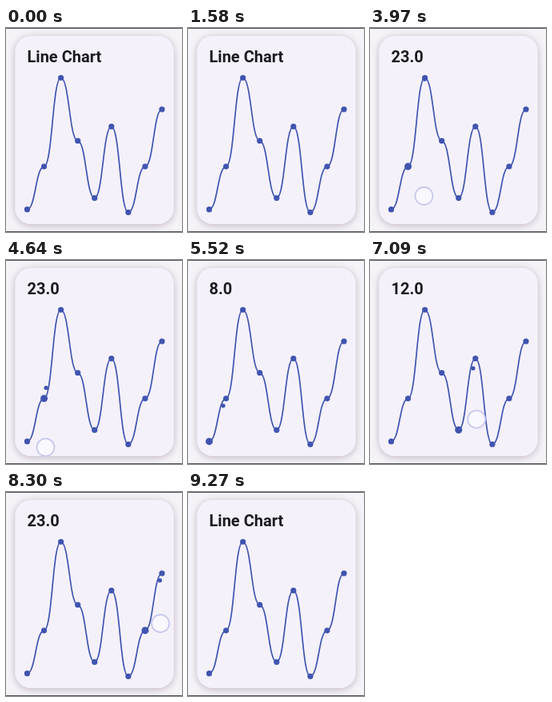
Write an HTML page that moves like this. It is 220 px wide and 256 px high and loops after 9300 ms.

```html
<!DOCTYPE html>
<html lang="en">
<head>
<meta charset="utf-8">
<title>Line Chart</title>
<style>
  html, body { margin: 0; width: 100%; height: 100%; overflow: hidden; background: #f5f2f8; }
  svg { display: block; width: 220px; height: 256px; }
  text { font: 700 20px Roboto, sans-serif; fill: #1b1b20; }
</style>
</head>
<body>
<svg viewBox="0 0 220 256">
  <defs>
    <filter id="shadow" x="-20%" y="-20%" width="140%" height="140%">
      <feDropShadow dx="0" dy="1.5" stdDeviation="4" flood-color="#2a2733" flood-opacity=".28"/>
    </filter>
  </defs>
  <rect width="220" height="256" fill="#f5f2f8"/>
  <rect x="11.5" y="10" width="198" height="236" rx="20" fill="#f4f1fa" filter="url(#shadow)"/>
  <rect width="220" height="1" fill="#55535a"/>
  <rect y="255" width="220" height="1" fill="#55535a"/>
  <text id="title" x="26.5" y="43"></text>
  <path id="line" fill="none" stroke="#4054b0" stroke-width="1.7"/>
  <g id="dots" fill="#4054b0"></g>
  <circle id="marker" r="2.6" fill="#4054b0"/>
  <circle id="touch" r="11" fill="#fbfaff" fill-opacity=".75" stroke="#c9c9ee" stroke-width="1.8"/>
</svg>
<script>
const LOOP = 9300;
const MIDDLE = 147;
const LAG = 25;
const values = [8, 23, 54, 32, 12, 37, 7, 23, 43];
const left = 26.5, step = 21.06;
const pointX = i => left + step * i;
const valueY = v => 62.5 + (54 - v) * 3.59;

// Each drag: visible and active periods, then [time, x, y] waypoints.
const drags = [
  { show: 2880, start: 2880, end: 6390, path: [
    [2880, 99, 182], [3270, 88, 191], [3800, 73, 205], [4300, 57, 223], [4640, 49.5, 235],
    [4730, 46.8, 239], [4950, 52, 247], [5300, 46, 261], [5520, 44, 269]] },
  { show: 6730, start: 6880, end: 9090, path: [
    [6730, 90, 213.5], [6870, 90, 213.5], [7000, 114, 206], [7090, 133, 200], [7300, 153, 192],
    [7600, 170, 184], [7820, 178, 179], [8300, 193, 165], [8700, 202, 160]] }
];

const $ = id => document.getElementById(id);
const clamp = (v, lo, hi) => Math.min(hi, Math.max(lo, v));
const easeInOut = p => p < .5 ? 4 * p ** 3 : 1 - (2 - 2 * p) ** 3 / 2;

function set(el, attrs) {
  for (const name in attrs) el.setAttribute(name, attrs[name]);
}

const dots = values.map(() =>
  $('dots').appendChild(document.createElementNS('http://www.w3.org/2000/svg', 'circle')));

// Smooth position along the waypoints; axis 1 is x, axis 2 is y.
function along(path, t, axis) {
  const last = path.length - 1;
  t = clamp(t, path[0][0], path[last][0]);
  let i = 0;
  while (i < last - 1 && t > path[i + 1][0]) i++;
  const slope = k => {
    if (k === 0 || k === last) return 0;
    const before = (path[k][axis] - path[k - 1][axis]) / (path[k][0] - path[k - 1][0]);
    const after = (path[k + 1][axis] - path[k][axis]) / (path[k + 1][0] - path[k][0]);
    return before * after > 0 ? 2 * before * after / (before + after) : 0;
  };
  const a = path[i], b = path[i + 1], span = b[0] - a[0];
  const u = (t - a[0]) / span, w = 1 - u;
  return a[axis] * w * w * (1 + 2 * u) + b[axis] * u * u * (3 - 2 * u)
    + span * u * w * (slope(i) * w - slope(i + 1) * u);
}

function curve(ys) {
  return ys.reduce((d, y, i) => {
    if (!i) return `M${left} ${y}`;
    const mid = pointX(i - .5);
    return `${d}C${mid} ${ys[i - 1]} ${mid} ${y} ${pointX(i)} ${y}`;
  }, '');
}

function draw(t) {
  const grow = t < 120 ? 1 : easeInOut(clamp((t - 150) / 1450, 0, 1));
  const ys = values.map(v => MIDDLE + (valueY(v) - MIDDLE) * grow);
  const drag = drags.find(d => t >= d.show && t < d.end + 150);
  const active = drag && t >= drag.start && t < drag.end;
  let selected = -1;

  if (active) {
    const position = clamp((along(drag.path, t - LAG, 1) - left) / step, 0, values.length - 1);
    selected = Math.floor(position);
    const next = Math.min(selected + 1, values.length - 1);
    const y = ys[selected] + (ys[next] - ys[selected]) * (position - selected);
    set($('marker'), { cx: pointX(position), cy: y });
  }
  set($('marker'), { opacity: active ? 1 : 0 });
  $('title').textContent = active ? values[selected].toFixed(1) : 'Line Chart';

  set($('line'), { d: curve(ys) });
  dots.forEach((dot, i) =>
    set(dot, { cx: pointX(i), cy: ys[i], r: i === selected ? 4.5 : 3.6 }));

  set($('touch'), drag
    ? { cx: along(drag.path, t, 1), cy: along(drag.path, t, 2), opacity: clamp(1 - (t - drag.end) / 150, 0, 1) }
    : { opacity: 0 });
}

const begin = performance.now();
function frame() {
  draw((performance.now() - begin) % LOOP);
  requestAnimationFrame(frame);
}
draw(0);
requestAnimationFrame(frame);
</script>
</body>
</html>
```
